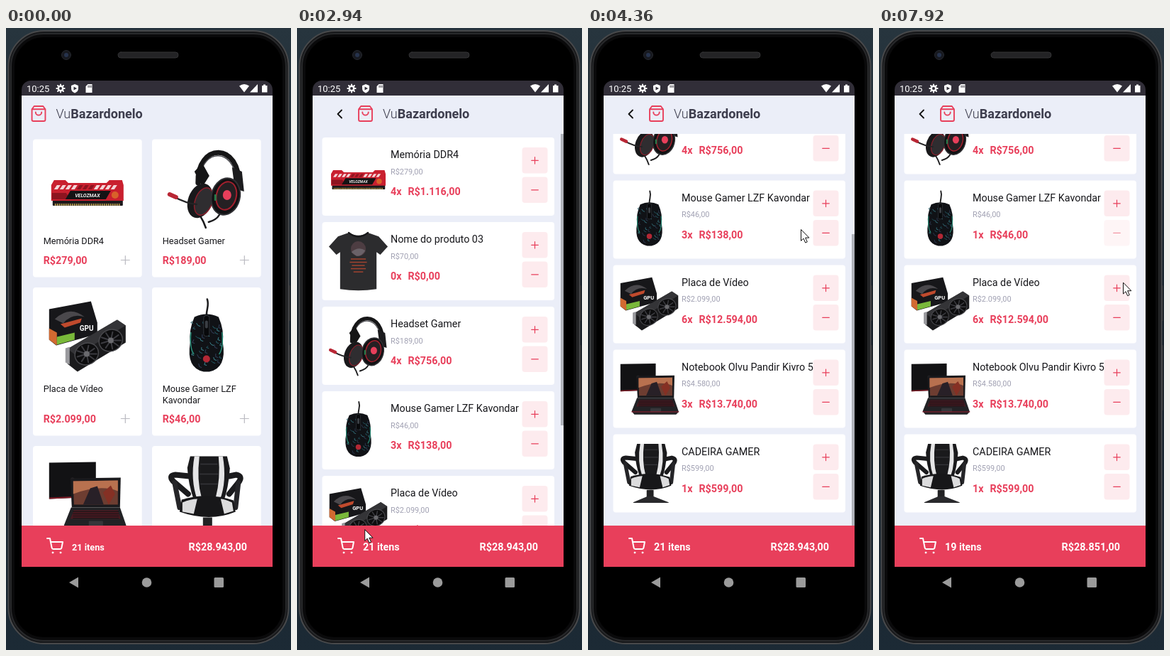
Write an HTML page with a canvas that moves like this. It is 402x875 px and loops after 8 s.

```html
<!DOCTYPE html>
<html lang="pt-BR">
<head>
<meta charset="utf-8">
<title>Carrinho</title>
<style>
html, body { margin: 0; width: 100%; height: 100%; overflow: hidden; background: #1f2c36; }
canvas { display: block; width: 402px; height: 875px; }
</style>
</head>
<body>
<canvas id="stage" width="402" height="875"></canvas>
<script>
const ctx = document.getElementById('stage').getContext('2d');
const LOOP = 8000, ACCENT = '#e83f5b', PAGE = '#ebeef8', INK = '#17171b';
const TOP = 95, VIEW = 663, MAX_SCROLL = 296.5;

// ---- drawing helpers ----
function rect(x, y, w, h, r, fill, stroke, lw = 1) {
  ctx.beginPath();
  ctx.roundRect(x, y, w, h, r);
  paint(fill, stroke, lw);
}
function oval(x, y, rx, ry, fill, stroke, lw = 1, turn = 0) {
  ctx.beginPath();
  ctx.ellipse(x, y, rx, ry, turn, 0, 7);
  paint(fill, stroke, lw);
}
function paint(fill, stroke, lw) {
  if (fill) { ctx.fillStyle = fill; ctx.fill(); }
  if (stroke) { ctx.strokeStyle = stroke; ctx.lineWidth = lw; ctx.stroke(); }
}
function path(d, fill, stroke, lw = 1) {
  const p = new Path2D(d);
  if (fill) { ctx.fillStyle = fill; ctx.fill(p); }
  if (stroke) { ctx.strokeStyle = stroke; ctx.lineWidth = lw; ctx.stroke(p); }
}
function text(s, x, y, size, color, weight = 400, align = 'left') {
  ctx.font = `${weight} ${size}px Roboto, sans-serif`;
  ctx.textAlign = align;
  ctx.fillStyle = color;
  ctx.fillText(s, x, y);
}
function at(x, y, scale, draw) {
  ctx.save();
  ctx.translate(x, y);
  ctx.scale(scale, scale);
  draw();
  ctx.restore();
}
function clipped(x, y, w, h, draw) {
  ctx.save();
  ctx.beginPath();
  ctx.rect(x, y, w, h);
  ctx.clip();
  draw();
  ctx.restore();
}
function faded(alpha, draw) {
  ctx.save();
  ctx.globalAlpha *= alpha;
  draw();
  ctx.restore();
}
const money = v => 'R$' + String(v).replace(/\B(?=(\d{3})+$)/g, '.') + ',00';

// ---- timing helpers ----
const ramp = (t, a, b) => Math.min(1, Math.max(0, (t - a) / (b - a)));
const press = (t, down, up) => 1 - .8 * (ramp(t, down, down + 150) - ramp(t, up, up + 250));
function revealEase(x) {
  const curve = (s, a, b) => 3 * (1 - s) ** 2 * s * a + 3 * (1 - s) * s * s * b + s ** 3;
  let lo = 0, hi = 1;
  for (let i = 0; i < 24; i++) {
    const mid = (lo + hi) / 2;
    if (curve(mid, .2833, .31833) < x) lo = mid; else hi = mid;
  }
  return curve(hi, .99, .99);
}

// ---- product pictures, drawn in a box of -55..55 ----
const pictures = {
  memory() {
    rect(-49, 12, 99, 12, 1, '#1c191b');
    path('M-51 -5L-47 -12H-31L-27 -8H27L31 -12H49L51 -5V17H-51Z', '#c9202f');
    for (let i = -5; i < 6; i++) path(`M${i * 8 - 3} -5h5l-4 6h-5z`, Math.abs(i) < 2 ? '#8d1420' : '#f3d5d8');
    path('M-50 6H-30L-24 15H-50Z', '#8d1420');
    path('M-24 3H33L26 15H-31Z', '#151315');
    text('VELOZMAX', 0, 12, 7, '#eee', 'italic 700', 'center');
    oval(39, 9, 5, 5, '#d8622a');
    for (let x = -46; x < 47; x += 3) rect(x, 21, 1.8, 3, 0, '#b49a52');
  },
  shirt() {
    path('M-18 -53Q0 -43 18 -53L38 -46L55 -27L41 -12L34 -17V52Q0 57 -34 52V-17L-41 -12L-55 -27L-38 -46Z', '#2c2c2e');
    path('M-18 -53Q0 -38 18 -53', null, '#171719', 3);
    oval(0, -23, 14, 14, '#4d3d42');
    path('M-13 -17Q0 -28 13 -20Q6 -8 -4 -10Z', '#6a6268');
    [28, 32, 24, 28, 18].forEach((w, i) => rect(-w / 2, -5 + i * 6, w, 2, 0, '#a0432f'));
  },
  headset() {
    path('M-12 -8C-14 -64 48 -68 46 -2', null, '#161617', 7);
    path('M-9 -16C-5 -56 38 -58 42 -12', null, '#4b4b50', 1.5);
    path('M-17 -24L-6 -36L4 -18L-6 -2Z', '#151516');
    path('M36 -30L50 -24L53 4L40 0Z', '#1c1c1e');
    oval(-9, 17, 17, 25, '#19191b', null, 1, .35);
    oval(-4, 18, 12, 20, '#2f2d30', '#8b1f2b', 1.5, .35);
    path('M-14 22Q-28 21 -47 11', null, '#232325', 2.5);
    path('M-52 8L-43 12', null, '#b92735', 6);
    oval(27, 11, 20, 26, '#111113', '#303034', 2, .25);
    oval(28, 10, 14, 20, '#252023', '#a31f2d', 2, .25);
    oval(29, 9, 6, 7, ACCENT);
    rect(11, 8, 3, 9, 1, '#277a4a');
    path('M-8 40Q-4 46 -1 55M18 37Q14 44 3 47', null, '#1b1b1d', 2.5);
  },
  gpu() {
    path('M-54 -39L5 -50L14 -20V-4L-44 12L-54 4Z', '#17171a');
    path('M-46 -25Q-25 -45 -4 -28Q-22 -34 -34 -19Z', '#4a484c');
    path('M-38 -18L-8 -26L-10 -20L-32 -13Z', '#c04a2d');
    path('M-54 -12L-43 -6V12L-54 4Z', '#d26a31');
    path('M-43 0L-18 -6V4L-43 11Z', '#79b83a');
    text('GPU', -11, -9, 10, '#fff', 700);
    path('M-28 17L42 -24L54 -16V8L-14 49L-28 38Z', '#1b1b1d');
    path('M-28 17L42 -24L54 -16L-16 26Z', '#343437');
    for (const [x, y] of [[-1, 24], [33, 5]]) {
      oval(x, y, 17, 15, '#0d0d0e', '#48484c', 1.5, -.5);
      for (let a = 0; a < 6.2; a += .7)
        path(`M${x} ${y}l${14 * Math.cos(a)} ${12 * Math.sin(a)}`, null, '#3b3b40', 2);
      oval(x, y, 4, 4, '#6a6a6e');
    }
    path('M-31 16L-25 14V39L-31 36Z', '#9a9a9e');
  },
  mouse() {
    path('M0 -30C0 -40 4 -44 1 -53', null, '#1b1b1d', 2.5);
    path('M-17 -28Q0 -36 17 -28Q25 -10 23 8Q29 44 4 49H-4Q-29 44 -23 8Q-25 -10 -17 -28Z', '#101216');
    ctx.lineCap = 'round';
    for (let i = 0; i < 34; i++) {
      const x = (i * 37 % 41) - 20, y = (i * 23 % 62) - 22;
      path(`M${x} ${y}l${i % 5 - 2} ${i % 3 + 2}l3 1`, null, ['#245f6b', '#3c8792', '#33405c'][i % 3], 1);
    }
    path('M-22 -6Q-24 16 -18 24M22 -6Q24 16 18 24', null, '#278d78', 1.5);
    rect(-4, -30, 8, 29, 3, '#08090b', '#30343a');
    rect(-2, -23, 4, 11, 2, '#3a3e44');
    oval(0, 31, 5, 5, '#b32835');
  },
  notebook() {
    path('M-54 -46L12 -47V2L-54 5Z', '#121214');
    path('M-53 4L12 1', null, '#7d1b26', 2);
    oval(-21, -22, 3, 3, '#2d2a2d');
    path('M-24 -24L47 -25L46 17H-22Z', '#1a1a1d');
    path('M-20 -20L43 -21V13H-19Z', '#6d3d31');
    path('M-20 -20L43 -21V-6Q18 -16 -20 -2Z', '#b8714f');
    path('M-6 13L4 -10L14 -13L23 13Z', '#282027');
    path('M22 -4L33 -14L39 -2L30 13Z', '#853024');
    path('M-23 17H46L55 43L50 48H-28L-33 42Z', '#222225');
    path('M-19 21H43L47 33H-24Z', '#4b1820');
    for (let y = 23; y < 33; y += 3) path(`M-20 ${y}H44`, null, '#151517', 1.2);
    rect(2, 36, 20, 7, 1, '#36363a');
    path('M-33 43H55', null, '#a21f30', 1.2);
  },
  chair() {
    path('M-23 -55H29L33 -38Q31 -10 24 9H-17Q-26 -16 -27 -39Z', '#1a1a1c');
    path('M-17 -55H-10Q-14 -22 -7 3L-13 6Q-23 -22 -17 -55ZM23 -55H17Q20 -24 13 3L19 6Q29 -20 23 -55Z', '#e5e5e6');
    path('M-8 -44H15M-9 -30H16M-8 -16H15', null, '#353539', 1.5);
    path('M-26 -2L-47 -20Q-54 -28 -44 -29L-24 -27M32 -2L45 -18Q52 -27 42 -29L32 -27', null, '#1b1b1d', 8);
    path('M-45 -18L-38 17M45 -18L41 17', null, '#252528', 7);
    path('M-35 6Q2 -5 38 7L41 23Q5 38 -38 23Z', '#171719');
    path('M-34 10Q-22 5 -13 5L-18 26L-34 23ZM36 10Q25 5 20 5L25 26L38 22Z', '#dcdcdd');
    rect(-5, 31, 13, 19, 0, '#222224');
    path('M-30 54L-4 43H8L36 54V55H-30Z', '#29292c');
  }
};
const picture = (name, x, y, scale) => at(x, y, scale, pictures[name]);

// ---- icons ----
const bag = (x, y) => at(x - 12.6, y - 12.6, 1.05, () =>
  path('M6 2L3 6v14a2 2 0 0 0 2 2h14a2 2 0 0 0 2-2V6l-3-4zM3 6H21M16 10a4 4 0 0 1-8 0', null, ACCENT, 1.8));
const cart = (x, y) => at(x, y, 1, () => {
  path('M1 1h4l2.68 13.39a2 2 0 0 0 2 1.61h9.72a2 2 0 0 0 2-1.61L23 6H6', null, '#fff', 2);
  oval(9, 21, 1, 1, '#fff', '#fff');
  oval(20, 21, 1, 1, '#fff', '#fff');
});
function sign(x, y, r, color, plus) {
  path(`M${x - r} ${y}h${2 * r}` + (plus ? `M${x} ${y - r}v${2 * r}` : ''), null, color, 1.2);
}

// ---- phone ----
function phone() {
  const bg = ctx.createLinearGradient(0, 0, 0, 875);
  bg.addColorStop(0, '#27353e');
  bg.addColorStop(.5, '#17212a');
  bg.addColorStop(1, '#1c2a35');
  rect(0, 0, 402, 875, 0, bg);
  rect(397, 362, 4, 50, 1, '#2d2f31');
  rect(397, 446, 4, 92, 1, '#2d2f31');
  rect(3.5, 4, 395, 862, 50, '#17181a', '#48494b', 2);
  rect(7, 8, 388, 854, 46, '#0a0a0b', '#28292b', 2);
  rect(12, 13, 378, 844, 41, '#000');
  rect(158, 34, 85, 8, 4, '#232325', '#343436');
  oval(85, 38, 6.5, 6.5, '#17191f', '#26282e');
  oval(85, 38, 3, 3, '#26334d');
  rect(22, 74, 354, 40, [13, 13, 0, 0], '#312e38');
  statusBar();
  const grey = '#9b9b9b';
  path('M89 780L102 772.5V787.5Z', grey);
  oval(198.5, 780, 6.8, 6.8, grey);
  rect(293.5, 773, 13.5, 14, 1.5, grey);
}
function statusBar() {
  const w = '#fff';
  text('10:25', 29, 89.5, 13, w);
  oval(77, 85, 3.2, 3.2, null, w, 2.4);
  for (let i = 0; i < 8; i++) {
    const a = i * Math.PI / 4, c = Math.cos(a), s = Math.sin(a);
    path(`M${77 + 4 * c} ${85 + 4 * s}L${77 + 5.6 * c} ${85 + 5.6 * s}`, null, w, 2);
  }
  path('M97 79L102 81V85Q102 89.5 97 91.5Q92 89.5 92 85V81Z', w);
  path('M95.5 82.5L100 85L95.5 87.5Z', '#312e38');
  path('M115.5 79H121.5V91H112.5V82Z', w);
  path('M116 81v2.5M118 81v2.5M120 81v2.5', null, '#312e38', .9);
  path('M329 81.5Q336 76.5 343 81.5L336 90.5Z', w);
  path('M355 79V90.5H344Z', w);
  path('M363 79.5h3v1.5h2.5v9.5h-7.5v-9.5h2z', w);
}

// ---- screens ----
function header(x) {
  bag(x, 120.5);
  text('Vu', x + 24.5, 127, 18, '#3d3d4d', 300);
  const w = ctx.measureText('Vu').width;
  text('Bazardonelo', x + 24.5 + w, 127, 18, '#3d3d4d', 700);
}
function footer(count, total, size, alpha) {
  rect(22, 700, 354, 58, 0, ACCENT);
  faded(alpha, () => {
    cart(57, 717);
    text(count + ' itens', 93, size > 14 ? 735 : 734.5, size, '#fff', 700);
  });
  text(money(total), 340, 735, 14.3, '#fff', 700, 'right');
}
const shelf = [
  ['memory', ['Memória DDR4'], 279], ['headset', ['Headset Gamer'], 189],
  ['gpu', ['Placa de Vídeo'], 2099], ['mouse', ['Mouse Gamer LZF', 'Kavondar'], 46],
  ['notebook', [], 0], ['chair', [], 0]
];
function catalog(t) {
  rect(22, TOP, 354, 680, 0, PAGE);
  header(46);
  shelf.forEach(([pic, name, price], i) => {
    const x = i % 2 ? 206 : 38, row = i >> 1;
    const y = [156.5, 365, 588][row], h = row ? 208.5 : 194;
    rect(x, y, 153.7, h, 4, '#fff');
    picture(pic, x + 76.8, y + 69.5, 1);
    if (!price) return;
    name.forEach((s, k) => text(s, x + 14.7, y + 147.3 + k * 15.3, 12.7, INK));
    text(money(price), x + 14.7, y + h - 18.5, 14.3, ACCENT, 700);
    sign(x + 130.3, y + h - 24, 6, '#b9b9c0', true);
  });
  footer(21, 28943, 12.7, press(t, 1760, LOOP));
}

const basket = [
  ['memory', 'Memória DDR4', 279, 4], ['shirt', 'Nome do produto 03', 70, 0],
  ['headset', 'Headset Gamer', 189, 4], ['mouse', 'Mouse Gamer LZF Kavondar', 46, 3],
  ['gpu', 'Placa de Vídeo', 2099, 6], ['notebook', 'Notebook Olvu Pandir Kivro 5', 4580, 3],
  ['chair', 'CADEIRA GAMER', 599, 1]
];
function button(y, plus, alpha) {
  faded(alpha, () => {
    rect(317.5, y, 36, 36.5, 4, '#fdebee');
    sign(335.5, y + 18.3, 4.8, ACCENT, plus);
  });
}
function basketScreen(t) {
  const mice = 3 + (t >= 5350) - (t >= 6500) - (t >= 7200) - (t >= 7740);
  const quantity = i => i === 3 ? mice : basket[i][3];
  const plusAlpha = press(t, 5040, 5350);
  const minusAlpha = press(t, 6340, 6500) * press(t, 7040, 7440) * press(t, 7590, 7820);
  const done = 1 - (1 - ramp(t, 3672, 4320)) ** 2;
  let count = 0, total = 0;

  rect(22, TOP, 354, VIEW, 0, PAGE);
  path('M63 115.5L57.5 121L63 126.5', null, '#111', 1.8);
  header(96.5);
  clipped(22, 149, 354, 551, () => {
    basket.forEach(([pic, name, price], i) => {
      const y = 154 + 119 * i - MAX_SCROLL * done, n = quantity(i);
      count += n;
      total += n * price;
      rect(35.5, y, 327.5, 110, 4, '#fff');
      picture(pic, 86.5, y + 55, .755);
      button(y + 14, true, i === 3 ? plusAlpha : 1);
      button(y + 55.5, false, i === 3 ? minusAlpha : 1);
      text(name, 132, y + 29, 14.3, INK);
      text(money(price), 132, y + 51.5, 10.9, '#a0a0b2');
      text(n + 'x', 132, y + 81.3, 14.3, ACCENT, 700);
      text(money(n * price), 156.5, y + 81.3, 14.3, ACCENT, 700);
    });
    const thumb = 149 + 141 * Math.sin(done * Math.PI / 2);
    faded(1 - ramp(t, 4480, 4750), () => rect(372, thumb, 4, 410, 0, 'rgba(0,0,0,.25)'));
  });
  footer(count, total, 14.3, 1);
}

function app(t) {
  const p = revealEase(ramp(t, 2352, 2777)), rest = VIEW * (1 - p);
  clipped(22, TOP, 354, VIEW, () => {
    if (p < 1) {
      at(0, -.02 * VIEW * p, 1, () => catalog(t));
      rect(22, TOP, 354, VIEW, 0, `rgba(0,0,0,${.1 * ramp(p, 0, .36)})`);
    }
    if (p > 0) clipped(22, TOP + rest, 354, VIEW, () => at(0, .041 * rest, 1, () => basketScreen(t)));
  });
}

// ---- pointer: time, x, y ----
const route = [
  [290, 324, 862], [670, 280, 645], [840, 280, 645], [1000, 260, 636], [1600, 78, 736],
  [2700, 78, 736], [2940, 95, 706], [3170, 143, 581], [3250, 143, 581], [3480, 152, 561],
  [3600, 152, 561], [3870, 167, 298], [3960, 172, 245], [4430, 322, 290], [5000, 348, 252],
  [5700, 348, 252], [6120, 334, 291], [6200, 339, 291], [7740, 339, 291], [7900, 344, 358]
];
function pointer(t) {
  if (t < route[0][0]) return;
  const i = route.findIndex(k => k[0] > t);
  const b = route.at(i), a = i < 0 ? b : route[i - 1];
  const u = i < 0 ? 1 : ramp(t, a[0], b[0]);
  const x = a[1] + (b[1] - a[1]) * u, y = a[2] + (b[2] - a[2]) * u;
  if (t >= 3620 && t < 3960) oval(x + .5, y, 12, 12, 'rgba(255,247,70,.72)');
  at(x, y, 1, () => path('M.5 .5V16L4 12.7L6.7 18.7L9.3 17.5L6.6 11.7H11.5Z', '#fff', '#111', 1));
}

function frame(now) {
  const t = now % LOOP;
  ctx.lineCap = ctx.lineJoin = 'round';
  phone();
  app(t);
  pointer(t);
  requestAnimationFrame(frame);
}
requestAnimationFrame(frame);
</script>
</body>
</html>
```
